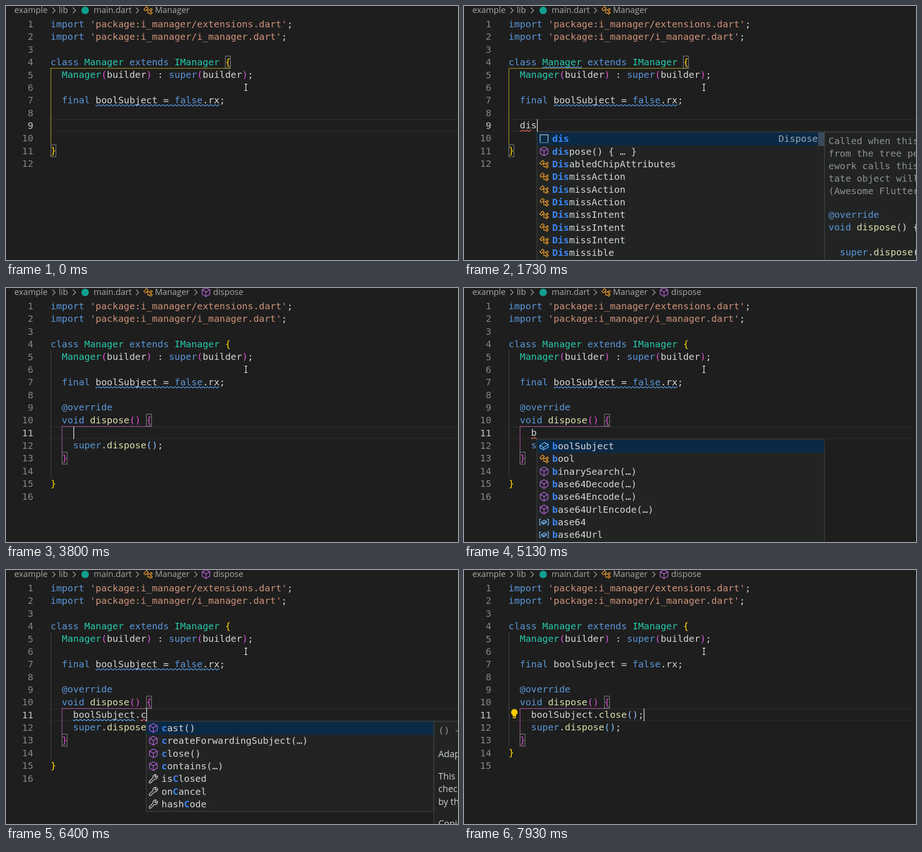
Animation of 974 by 548 pixels, one loop 8000 ms. Source, as an HTML page with a canvas:

```html
<!DOCTYPE html>
<html lang="en">
<head>
<meta charset="utf-8">
<title>Code editor</title>
<style>
html, body { margin: 0; width: 100%; height: 100%; overflow: hidden; background: #1e1e1e; }
canvas { display: block; }
</style>
</head>
<body>
<canvas id="stage" width="974" height="548"></canvas>
<script>
(() => {
const ctx = document.getElementById('stage').getContext('2d', { alpha: false });
const LOOP = 8000, LEFT = 96, CHAR = 12.137, ROW = 27.36;
const MONO = '20.16px "DejaVu Sans Mono", monospace';
const SANS = '18px "Open Sans", sans-serif';
const DOC = '19.4px "Open Sans", sans-serif';
const BLUE = '#5aa7f7', RED = '#f06a5c', BORDER = '#454545', PANEL = '#222424';
const INK = {
  d: '#d4d4d4', k: '#5996d8', t: '#26c9aa', s: '#ce9178', f: '#dcdcaa',
  y: '#ffd700', m: '#da52d2', b: '#87bffa', g: '#8f9191'
};

// A tilde and a letter switch the ink.
const HEAD = [
  "~kimport ~s'package:i_manager/extensions.dart'~d;",
  "~kimport ~s'package:i_manager/i_manager.dart'~d;",
  '',
  '~kclass ~tManager ~kextends ~tIManager ~y{',
  '  ~tManager~m(~dbuilder~m) ~d: ~ksuper~m(~dbuilder~m)~d;',
  '',
  '  ~kfinal ~dboolSubject = ~kfalse~d.rx;',
  ''
];
const METHOD = ['  ~k@override', '  ~kvoid ~fdispose~m() {'];
const SUPER = ['    ~ksuper~d.~fdispose~b()~d;', '  ~m}'];

const DIS = [
  ['snippet', 'dis', 0, 3], ['cube', 'dispose() { … }', 0, 3],
  ['class', 'DisabledChipAttributes', 0, 3],
  ...Array(3).fill(['class', 'DismissAction', 0, 3]),
  ...Array(3).fill(['class', 'DismissIntent', 0, 3]),
  ['class', 'Dismissible', 0, 3]
];
const B = [
  ['field', 'boolSubject', 0, 1], ['class', 'bool', 0, 1],
  ...['binarySearch', 'base64Decode', 'base64Encode', 'base64UrlEncode'].map(n => ['cube', n + '(…)', 0, 1]),
  ['variable', 'base64', 0, 1], ['variable', 'base64Url', 0, 1]
];
const C = [
  ['cube', 'cast()', 0, 1], ['cube', 'createForwardingSubject(…)', 0, 1],
  ['cube', 'close()', 0, 1], ['cube', 'contains(…)', 0, 1],
  ['wrench', 'isClosed', 2, 1], ['wrench', 'onCancel', 2, 1], ['wrench', 'hashCode', 4, 1]
];
const CL = [['cube', 'close()', 0, 2], ['wrench', 'isClosed', 2, 2], ['wrench', 'onCancel', 2, 1]];

const rowY = row => 25.2 + ROW * (row - 1);
const colX = col => LEFT + col * CHAR;

function rect(x, y, w, h, color) {
  ctx.fillStyle = color;
  ctx.fillRect(x, y, w, h);
}

function text(s, x, y, color, font = MONO) {
  ctx.font = font;
  ctx.fillStyle = color;
  ctx.fillText(s, x, y);
}

function path(points, close) {
  ctx.beginPath();
  for (let i = 0; i < points.length; i += 2) ctx.lineTo(points[i], points[i + 1]);
  if (close) ctx.closePath();
  ctx.stroke();
}

function code(line, x, y) {
  let ink = 'd';
  for (const run of line.split(/(~[a-z])/)) {
    if (run[0] === '~') { ink = run[1]; continue; }
    if (run.trim()) text(run, x, y, INK[ink]);
    x += run.length * CHAR;
  }
}

function squiggle(row, col, len, color) {
  const x = colX(col), y = rowY(row) + ROW - 4.5, w = len * CHAR, half = 4.32;
  ctx.save();
  ctx.beginPath();
  ctx.rect(x, y, w, 4.4);
  ctx.clip();
  ctx.strokeStyle = color;
  ctx.lineWidth = 1.45;
  const pts = [];
  for (let i = 0, px = x - 1.8; px < x + w + 9; i++, px += half) pts.push(px, y + (i % 2 ? 4 : 0.2));
  path(pts);
  ctx.restore();
}

function bracketBox(row, col) {
  ctx.strokeStyle = '#858585';
  ctx.lineWidth = 1.2;
  ctx.strokeRect(Math.round(colX(col)) + 0.6, rowY(row) + 0.7, 11, ROW - 1.6);
}

function fieldCube(s) {
  path([-9 * s, -1 * s, 1 * s, -7.5 * s, 9 * s, -3.5 * s, 9 * s, 2.5 * s, -1 * s, 8 * s, -9 * s, 4 * s], true);
  path([-9 * s, -1 * s, -1 * s, 3 * s, 9 * s, -3.5 * s]);
  path([-1 * s, 3 * s, -1 * s, 8 * s]);
}

const ICONS = {
  cube: ['#b765dc', () => {
    path([0, -9.5, 8.3, -5, 8.3, 4.6, 0, 9.5, -8.3, 4.6, -8.3, -5], true);
    path([-8.3, -5, 0, -0.6, 8.3, -5]);
    path([0, -0.6, 0, 9.5]);
  }],
  class: ['#ee9d28', () => {
    path([-9, -2, -3, -8, 0.5, -4.5, -5.5, 1.5], true);
    path([-3.5, -0.8, 3.5, -0.8]);
    path([-0.5, -0.8, -0.5, 6, 3.5, 6]);
    for (const y of [-1, 6]) path([3.5, y + 0.5, 7, y - 3, 9.3, y - 0.7, 5.8, y + 2.8], true);
  }],
  field: ['#75beff', () => fieldCube(1)],
  variable: ['#75beff', () => {
    path([-6.5, -6, -9.5, -6, -9.5, 6, -6.5, 6]);
    path([6.5, -6, 9.5, -6, 9.5, 6, 6.5, 6]);
    fieldCube(0.58);
  }],
  snippet: ['#b9c6d2', () => {
    path([-8.6, 7, -8.6, -8.6, 8.6, -8.6, 8.6, 7]);
    for (let x = -9; x < 9; x += 3.2) rect(x, 7.8, 1.6, 1.6, '#b9c6d2');
  }],
  wrench: ['#d0d0d0', () => {
    path([-9, 6, -1, -2, -0.5, -6, 3, -9, 6.2, -8.6, 3, -5, 5, -3, 8.8, -6.2, 9, -3, 6.5, 0.6, 2, 1.2, -6, 9, -8.5, 9], true);
  }]
};

function icon(name, x, y) {
  const [color, draw] = ICONS[name];
  ctx.save();
  ctx.translate(x, y);
  ctx.strokeStyle = color;
  ctx.lineWidth = 1.5;
  draw();
  ctx.restore();
}

function frame(x, y, w, h) {
  rect(x, y, w, h, BORDER);
  rect(x + 1.2, y + 1.2, w - 2.4, h - 2.4, PANEL);
}

function popup(col, row, items, h) {
  const x = Math.round(colX(col)) - 0.5, y = rowY(row), w = 621;
  frame(x, y, w, h || items.length * ROW + 4);
  rect(x + 1.2, y + 1.2, w - 2.4, ROW + 0.6, '#0a2945');
  items.forEach(([ico, label, from, len], i) => {
    const mid = y + 14.8 + i * ROW, base = mid + 6.9, lx = x + 33.5;
    const to = from + len;
    icon(ico, x + 16, mid);
    text(label.slice(0, from), lx, base, INK.d);
    text(label.slice(from, to), lx + from * CHAR, base, '#3b86f4', 'bold ' + MONO);
    text(label.slice(to), lx + to * CHAR, base, INK.d);
  });
  return x + w;
}

function disPopup() {
  const x = popup(5, 10, DIS, 330), y = rowY(10);
  text('Dispose', 677.5, y + 21.7, '#98a3ad');
  rect(763, y + 1.5, 14, 29, 'rgba(121,121,121,.42)');
  frame(x - 1.2, y, 240, 330);
  ['Called when this', 'from the tree pe', 'ework calls this', 'tate object will', '(Awesome Flutter']
    .forEach((s, i) => text(s, 785.5, 298 + i * 27, INK.g));
  ['~k@override', '~kvoid ~fdispose~d() {', '', '  ~ksuper~d.~fdispose~d();']
    .forEach((s, i) => code(s, 785.5, 457 + i * 27));
}

function memberDocs(lines) {
  frame(921.5, rowY(12), 100, 300);
  text('() → ', 931.5, 353, INK.g);
  lines.forEach(([s, y]) => text(s, 931.5, y, '#cccccc', DOC));
}

function guide(row, last, col, endCol, color) {
  const x = Math.round(colX(col)), y = rowY(row);
  rect(x, y, 1.4, rowY(last) - y, color);
  if (endCol) rect(x, y - 0.8, colX(endCol) - x, 1.3, color);
}

function crumbs(member) {
  const tone = '#a9a9a9';
  const say = (s, x) => text(s, x, 15, tone, SANS);
  const chevron = x => {
    ctx.strokeStyle = tone;
    ctx.lineWidth = 1.5;
    path([x - 3, 3.5, x + 3, 9.5, x - 3, 15.5]);
  };
  say('example', 18);
  say('lib', 113.5);
  say('main.dart', 189);
  say('Manager', 321);
  [103, 147, 283].forEach(chevron);
  ctx.fillStyle = '#0f9f8f';
  ctx.beginPath();
  ctx.arc(170.5, 9.5, 8, 0, 7);
  ctx.fill();
  icon('class', 306, 9.2);
  if (member) {
    chevron(409);
    icon(member === 'dis' ? 'field' : 'cube', 431, 9);
    say(member, 446.5);
  }
}

function bulb() {
  ctx.fillStyle = '#ffcc00';
  ctx.beginPath();
  ctx.arc(108.5, 307, 7, 0, 7);
  ctx.fill();
  rect(105, 311, 7, 5, '#ffcc00');
  rect(105, 317.2, 7, 2.6, '#d9ae0a');
}

function pointer() {
  const beam = (color, w) => {
    ctx.strokeStyle = color;
    ctx.lineWidth = w;
    path([514, 168.5, 520, 168.5]);
    path([514, 182.5, 520, 182.5]);
    path([517, 168.5, 517, 182.5]);
  };
  beam('#000', 3.6);
  beam('#f4f4f4', 1.6);
}

// Latest value whose start time has passed.
const at = (t, steps) => steps.reduce((v, [from, value]) => t >= from ? value : v, steps[0][1]);

function render(t) {
  const inside = t >= 2730, tidy = t >= 7930;
  const first = at(t, [[0, ''], [1270, 'd'], [1600, 'di'], [1670, 'dis']]);
  const call = at(t, [[0, ''], [4070, 'b'], [5600, 'boolSubject'], [6070, 'boolSubject.'],
    [6200, 'boolSubject.c'], [6600, 'boolSubject.cl'], [7000, 'boolSubject.close()'], [7870, 'boolSubject.close();']]);
  const inked = t >= 7200 ? call.replace('close()', '~fclose~b()~d') : call;
  const rows = inside
    ? [...HEAD, ...METHOD, '    ' + inked, ...SUPER, ...(tidy ? [] : ['']), '~y}', '']
    : [...HEAD, '  ' + first, '', '~y}', ''];
  const active = inside ? 11 : 9;
  const caretCol = inside ? 4 + call.length : 2 + first.length;

  rect(0, 0, 974, 548, '#1e1e1e');
  crumbs(at(t, [[0, ''], [2070, 'dis'], [3130, 'dispose']]));
  rect(LEFT, rowY(active) + 0.2, 878, 1.7, '#2b2b2b');
  rect(LEFT, rowY(active) + ROW - 2.4, 878, 1.7, '#2b2b2b');

  if (inside) {
    guide(5, tidy ? 14 : 15, 0, 0, '#404040');
    guide(11, 13, 2, 18, '#a0509c');
    bracketBox(10, 17);
    bracketBox(13, 2);
  } else {
    guide(5, 11, 0, 32, '#a3951f');
    bracketBox(4, 31);
    bracketBox(11, 0);
  }

  ctx.textAlign = 'right';
  rows.forEach((_, i) => text(i + 1, 58.8, rowY(i + 1) + 20.9, i + 1 === active ? '#c6c6c6' : '#858585'));
  ctx.textAlign = 'left';
  rows.forEach((line, i) => code(line, LEFT, rowY(i + 1) + 20.3));

  if (t < 7130) squiggle(7, 8, 22, BLUE);
  if (t >= 1330 && t < 3130) squiggle(4, 6, 7, BLUE);
  if (!inside) squiggle(9, 2, at(t, [[0, 0], [1330, 1], [1670, 2], [1800, 3]]), RED);
  if (t >= 4130 && t < 6270) squiggle(11, 4, t < 5600 ? 1 : 11, RED);
  if (t >= 6270 && t < 7130) {
    squiggle(11, 4, 11, BLUE);
    squiggle(11, 16, call.length - 12, RED);
  }

  if (at(t, [[0, 0], [400, 1], [930, 0], [1270, 1], [2200, 0], [2730, 1], [3270, 0], [3800, 1],
    [4530, 0], [5270, 1], [7470, 0], [7870, 1]])) {
    rect(Math.round(colX(caretCol)), rowY(active), 2, ROW, '#b4b5b3');
  }
  if ((t >= 5800 && t < 6130) || t >= 7400) bulb();

  if (t >= 1730 && t < 2730) disPopup();
  if (t >= 5130 && t < 5600) {
    const x = popup(5, 12, B, 260);
    if (t >= 5200) {
      frame(x - 1.2, rowY(12), 240, 42);
      text('BehaviorSubject<bool>', 786, 353, INK.g);
    }
  }
  if (t >= 6330 && t < 7000) {
    popup(17, 12, t < 6600 ? C : CL);
    if (t >= 6800) memberDocs([['Closes', 404]]);
    else if (t >= 6400) memberDocs([['Adapt this', 404], ['This stream', 452], ['checks at', 479], ['by this', 507], ['Copied', 554]]);
  }
  pointer();
}

function tick(now) {
  render(now % LOOP);
  requestAnimationFrame(tick);
}
render(0);
requestAnimationFrame(tick);
})();
</script>
</body>
</html>
```
